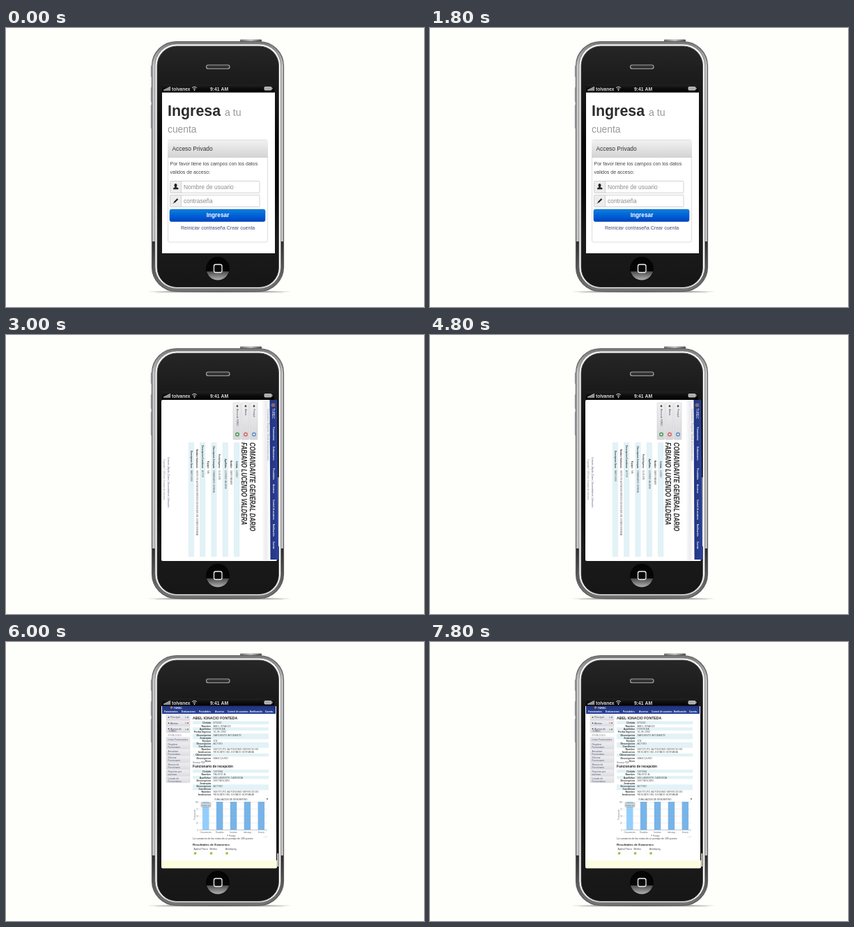
An HTML page with a canvas that plays this animation: 600 by 400 pixels, repeating every 9000 ms.

```html
<!DOCTYPE html>
<html lang="es">
<head>
<meta charset="utf-8">
<title>Acceso móvil</title>
<style>
html, body { margin: 0; width: 100%; height: 100%; overflow: hidden; background: #fefefb; }
canvas { display: block; }
</style>
</head>
<body>
<canvas id="stage" width="600" height="400"></canvas>
<script>
const ctx = document.getElementById('stage').getContext('2d');
const SANS = '"Liberation Sans", Arial, sans-serif';
const SQUASH = 0.75;
const BRAND = 'TUREC';
const MENU = ['Funcionarios', 'Evaluaciones', 'Postulados', 'Ascenso', 'Control de usuarios', 'Notificación', 'Cuenta'];
const ROW_BLUE = '#e2f2f6';

function rect(x, y, w, h, fill) {
  ctx.fillStyle = fill;
  ctx.fillRect(x, y, w, h);
}

function round(x, y, w, h, r, fill, stroke, lineWidth = 1) {
  ctx.beginPath();
  ctx.roundRect(x, y, w, h, r);
  if (fill) { ctx.fillStyle = fill; ctx.fill(); }
  if (stroke) { ctx.strokeStyle = stroke; ctx.lineWidth = lineWidth; ctx.stroke(); }
}

function dot(x, y, r, fill) {
  ctx.beginPath();
  ctx.arc(x, y, r, 0, Math.PI * 2);
  ctx.fillStyle = fill;
  ctx.fill();
}

function line(x1, y1, x2, y2, color, width = 1) {
  ctx.beginPath();
  ctx.moveTo(x1, y1);
  ctx.lineTo(x2, y2);
  ctx.strokeStyle = color;
  ctx.lineWidth = width;
  ctx.stroke();
}

function gradient(x1, y1, x2, y2, ...colors) {
  const g = ctx.createLinearGradient(x1, y1, x2, y2);
  colors.forEach((c, i) => g.addColorStop(i / (colors.length - 1), c));
  return g;
}

function text(str, x, y, size, color = '#333', style = '', align = 'left') {
  ctx.font = `${style} ${size}px ${SANS}`;
  ctx.fillStyle = color;
  ctx.textAlign = align;
  ctx.fillText(str, x, y);
}

// Text on the page turned a quarter clockwise and squeezed along its reading axis.
function sideText(str, x, y, ...rest) {
  ctx.save();
  ctx.translate(x, y);
  ctx.rotate(Math.PI / 2);
  ctx.scale(SQUASH, 1);
  text(str, 0, 0, ...rest);
  ctx.restore();
}

function drawPhone() {
  rect(0, 0, 600, 400, '#fefefb');
  rect(203, 377, 207, 2, gradient(203, 0, 410, 0, '#fefefb', '#8c8c8c', '#777', '#8c8c8c', '#fefefb'));
  rect(215, 379, 183, 1, '#e6e6e4');

  round(336, 16.5, 31, 3, 1, gradient(336, 0, 367, 0, '#666', '#bbb', '#444'));
  for (const [y, h] of [[54, 16], [85, 21], [110, 34]]) {
    round(208, y, 3, h, 1.5, '#d5d5da', '#a3a2ac', 0.8);
  }

  // Chrome rim: the lower part is dark plastic.
  const rim = ctx.createLinearGradient(0, 19, 0, 378);
  rim.addColorStop(0, '#777');
  rim.addColorStop(0.1, '#c4c4c4');
  rim.addColorStop(0.8, '#c4c4c4');
  rim.addColorStop(0.8, '#2c2c2c');
  rim.addColorStop(0.9, '#555');
  rim.addColorStop(1, '#777');
  round(209.5, 19.5, 189, 358, 35, rim, '#5c5c5c', 1.2);
  round(214, 23, 180.5, 350.5, 31, '#f8f8f8', '#777', 0.8);
  round(217, 26, 174.5, 345.5, 28, gradient(0, 26, 0, 372, '#262626', '#171717', '#080808', '#080808', '#1b1b1b', '#161616'), '#444', 0.8);

  round(287.5, 53, 33.5, 5.5, 2.75, '#333', '#a2a2a2', 1.2);

  dot(304, 345, 17, '#050505');
  ctx.save();
  ctx.beginPath();
  ctx.rect(286, 349, 36, 14);
  ctx.clip();
  dot(304, 345, 16.5, gradient(0, 349, 0, 362, '#4a4a4a', '#b5b5b5'));
  ctx.restore();
  round(298.5, 339, 11.5, 11.5, 2.5, '#0a0a0a', '#f2f2f2', 1.3);

  drawStatus();
}

function drawStatus() {
  rect(224, 81, 161, 12, gradient(0, 81, 0, 93, '#222', '#0c0c0c', '#000'));
  for (let i = 0; i < 5; i++) rect(226.5 + i * 2, 88 - i, 1.3, 2 + i, '#ddd');
  text('tolvanex', 238, 89.6, 6.5, '#ddd', 'bold');
  ctx.strokeStyle = '#ddd';
  ctx.lineWidth = 1;
  for (const r of [2.4, 4.6]) {
    ctx.beginPath();
    ctx.arc(270.5, 89, r, -Math.PI * 0.78, -Math.PI * 0.22);
    ctx.stroke();
  }
  dot(270.5, 89, 0.9, '#ddd');
  text('9:41 AM', 293, 89.6, 6.8, '#ddd', 'bold');
  round(371, 84.5, 10, 4.5, 1, '#a9a9a9', '#ddd', 0.8);
  rect(381.5, 85.7, 1, 2, '#ddd');
}

function drawLogin() {
  rect(224, 92.5, 162, 230.5, '#fff');
  text('Ingresa', 232, 126, 21.4, '#2c2c2c', 'bold');
  text('a tu', 314, 126, 14.2, '#999');
  text('cuenta', 232, 150, 13.8, '#999');

  round(232.5, 160.5, 143, 146.5, 2, '#fff', '#dedede');
  rect(232, 161, 144, 25, gradient(0, 161, 0, 186, '#f1f1f1', '#d3d3d3'));
  text('Acceso Privado', 238.5, 176, 8.4, '#333');
  text('Por favor llene los campos con los datos', 235.5, 197, 7, '#444');
  text('validos de acceso:', 235.5, 209, 7, '#444');

  const field = (y, hint) => {
    round(235.5, y + 0.5, 128.5, 17, 1, '#fff', '#d2d2d2');
    rect(236, y + 1, 15.5, 16, '#ededed');
    line(251.5, y + 1, 251.5, y + 17, '#d2d2d2');
    text(hint, 255, y + 11.5, 8.45, '#8c8c8c');
  };
  field(219, 'Nombre de usuario');
  field(239, 'contraseña');

  ctx.beginPath();
  ctx.ellipse(243.5, 225.5, 2, 2.5, 0, 0, Math.PI * 2);
  ctx.fillStyle = '#222';
  ctx.fill();
  round(240, 228.5, 7.5, 2.8, [2, 2, 0, 0], '#222');
  rect(242.5, 226, 2, 3, '#222');
  line(241.5, 250, 246.5, 245, '#222', 2.2);
  line(240, 251.5, 241.5, 250, '#222', 1);

  round(235, 260, 137, 17.5, 2.5, gradient(0, 260, 0, 277, '#0b83dc', '#0062d6', '#0045c4'), '#0755b8', 0.6);
  text('Ingresar', 304, 271.3, 8.3, '#fff', 'bold', 'center');
  text('Reiniciar contraseña Crear cuenta', 251, 289, 7, '#434b74');
}

function drawTurnedPage() {
  round(223, 93, 166, 231, 2, '#fff');
  rect(367, 94, 12, 229, gradient(367, 0, 379, 0, '#fff', '#ececf0', '#fff'));

  // The page leans slightly, so its header bar does too.
  ctx.beginPath();
  ctx.moveTo(378.5, 93);
  ctx.lineTo(389, 93);
  ctx.lineTo(391.5, 322);
  ctx.lineTo(379.5, 322);
  ctx.fillStyle = gradient(379, 0, 391, 0, '#22357f', '#2b419a');
  ctx.fill();
  line(391, 204, 391.5, 303, '#f8f8ee', 1);
  dot(383.5, 100.5, 2.8, '#8a6a58');
  sideText(BRAND, 381.5, 105, 5.9, '#fff');
  const tops = [132, 160, 191, 214, 236, 271, 296];
  MENU.forEach((item, i) => sideText(item, 382.5, tops[i], 4.1, '#fff', 'bold'));
  sideText('Funcionarios / Búsqueda / Detalle del funcionario activo', 374.5, 106, 4, '#8d93aa');

  const buttons = [['Principal', 350, '#5f92c4'], ['Alertas', 338, '#cf6a62'], ['Acerca de ' + BRAND, 326, '#4f9a56']];
  for (const [label, x, color] of buttons) {
    round(x, 97, 11, 53, 1, gradient(0, 97, 0, 150, '#f0f0f1', '#d6d6da'), '#d2d2d4', 0.6);
    dot(x + 6, 102, 1.4, '#444');
    sideText(label, x + 4.5, 106, 4, '#44485c');
    dot(x + 6, 142.5, 3, color);
    line(x + 6, 141, x + 6, 144, '#fff', 1);
    line(x + 4.5, 142.5, x + 7.5, 142.5, '#fff', 1);
  }

  sideText('COMANDANTE GENERAL DARIO', 349.5, 154, 10.7, '#2a2a2a', 'bold italic');
  sideText('FABIANO LUCENDO VALDERA', 338, 154, 10.7, '#2a2a2a', 'bold italic');

  const rows = [
    ['Cédula', '1234567'],
    ['Nombre', 'DARIO FABIANO'],
    ['Apellidos', 'LUCENDO VALDERA'],
    ['Fecha Ingreso', '01-06-1990'],
    ['Descripcion Jerarquia', 'COMANDANTE GENERAL'],
    ['Equipo', 'N/A'],
    ['Descripcion Condicion', 'ACTIVO'],
    ['Nombre Institucion', 'INSTITUTO AUTONOMO SERVICIO DE RESCATE DEL ESTADO SORVANA'],
    ['Descripcion Sexo', 'MASCULINO']
  ];
  rows.forEach(([label, value], i) => {
    const x = 327 - i * 8.15;
    if (i % 2 === 0) rect(x, 154, 8.2, 164, ROW_BLUE);
    sideText(label, x + 2.8, 191, 4, '#333', 'bold', 'right');
    sideText(value, x + 2.8, 194, 3.6, '#555');
  });

  sideText('Contacto | Ayuda | Datos | Desarrolladores | Ubicación', 232, 175, 4, '#555d86');
  sideText('Copyright © 2012 por el equipo de sistemas', 225.5, 178, 4, '#888');
}

function drawRow(top, label, value, blue, height = 4.5) {
  if (blue) rect(268, top, 109, height, ROW_BLUE);
  const put = (str, x, style, align) => str.split('|').forEach((part, i) =>
    text(part, x, top + 3.6 + i * 3.8, 3.6, style ? '#333' : '#555', style, align));
  put(label, 294, 'bold', 'right');
  put(value, 297.5, '', 'left');
}

function drawRows(top, rows) {
  rows.forEach(([label, value], i) => {
    const height = label.includes('|') ? 8 : 4.45;
    drawRow(top, label, value, i % 2 === 0, height);
    top += height;
  });
}

function drawChart() {
  text('EVALUACION DE DESEMPEÑO', 323, 227, 3.2, '#444', '', 'center');
  rect(374, 224, 2, 2, '#888');
  for (let i = 0; i < 5; i++) {
    line(277, 229.5 + i * 10, 375, 229.5 + i * 10, '#dedede', 0.5);
    text(String(100 - i * 25), 276, 231 + i * 10, 2.6, '#777', '', 'right');
  }
  for (let i = 0; i < 5; i++) {
    const x = 282 + i * 19.9;
    rect(x, 229, 9.5, 40.5, i ? '#78b4e8' : '#94cefa');
    text(['Conocimiento', 'Disciplina', 'Iniciativa', 'Liderazgo', 'Servicio'][i], x + 4.7, 274, 2.6, '#666', '', 'center');
  }
  line(277, 269.5, 375, 269.5, '#a8b8cc', 0.7);
  round(280, 230.5, 14, 6, 1, 'rgba(205,210,210,.9)', '#8c9ba6', 0.5);
  text('Puntaje: 100', 281, 234.5, 2.2, '#444');
  ctx.save();
  ctx.translate(272, 255);
  ctx.rotate(-Math.PI / 2);
  text('Puntuación', 0, 0, 3, '#777');
  ctx.restore();
  dot(318, 277.4, 0.9, '#70b0e7');
  text('Puntaje', 320, 278.5, 2.8, '#555');
  text('gráfico', 376, 280, 2.2, '#bbb', '', 'right');
}

function drawProfile() {
  rect(223, 92, 165, 221, '#fff');
  round(223, 313, 166, 11.5, [0, 0, 2, 2], '#fcfce0');
  rect(389.5, 303, 1.5, 19, '#fcfce0');
  rect(224, 91.5, 163, 11.5, gradient(0, 92, 0, 103, '#20337d', '#2a429a'));
  dot(237.5, 94, 1.7, '#c9853c');
  text(BRAND, 240.5, 95.5, 3.6, '#fff', 'bold');
  const lefts = [227, 252, 277, 300, 318, 350, 372];
  MENU.forEach((item, i) => text(item, lefts[i], 101, 3.15, '#fff', 'bold'));

  const button = (y, h) => round(230, y, 34, h, 0.8, gradient(0, y, 0, y + h, '#efeff2', '#dcdce2'), '#d2d2d8', 0.5);
  const links = [['Principal', 104, 8, '#4f91d2'], ['Alertas', 112.5, 7.5, '#d65449'], ['Acerca de', 120.5, 9.5, '#3b9c46']];
  links.forEach(([label, y, h, color], i) => {
    button(y, h);
    dot(233.5, y + 3.8, 0.9, '#334');
    text(label, 236, y + 5, 3.5, '#474b60');
    if (i === 2) text(BRAND, 233, y + 8.5, 3.5, '#474b60');
    dot(258, y + h / 2, 0.9, '#9aa');
    dot(261, y + h / 2, 1.1, color);
  });
  text('OPERACIONES', 232, 134.5, 2.7, '#888');
  const actions = ['Listar Funcionarios', 'Registrar|Funcionario', 'Actualizar|Funcionario', 'Eliminar|Funcionario',
    'Manejo de|Funcionario', 'Reportes por|ascenso', 'Listado de|Funcionarios'];
  actions.forEach((label, i) => {
    const y = i ? 134 + i * 9.75 : 136.5;
    button(y, i ? 9.2 : 6.5);
    label.split('|').forEach((part, k) => text(part, 232.5, y + 4.2 + k * 3.8, 3.4, '#555a70'));
  });

  text('ABEL IGNACIO FONTEDA', 268, 111, 5.2, '#222', 'bold');
  drawRows(113.5, [
    ['Cédula', '871002'],
    ['Nombre', 'ABEL IGNACIO'],
    ['Apellidos', 'FONTEDA'],
    ['Fecha Ingreso', '16-06-1992'],
    ['Descripcion|Jerarquia', 'SARGENTO AYUDANTE'],
    ['Equipo', '204'],
    ['Descripcion|Condicion', 'ACTIVO'],
    ['Nombre|Institucion', 'INSTITUTO AUTONOMO SERVICIO DE|RESCATE DEL ESTADO SORVANA'],
    ['Observacion', ''],
    ['Descripcion|Sexo', 'MASCULINO']
  ]);
  text('Generar PDF', 268, 174.3, 3, '#4a567f');
  text('Funcionario de recepción', 268, 180.3, 4.75, '#222', 'bold');
  drawRows(183, [
    ['Cédula', '1107088'],
    ['Nombre', 'FAUSTO A.'],
    ['Apellidos', 'BELLAMONTE CARDEÑA'],
    ['Descripcion|Jerarquia', 'DISTINGUIDO'],
    ['Descripcion|Condicion', 'ACTIVO'],
    ['Nombre|Institucion', 'INSTITUTO AUTONOMO SERVICIO DE|RESCATE DEL ESTADO SORVANA']
  ]);

  drawChart();
  text('La sumatoria de las notas da un puntaje de 100 puntos', 268, 283.2, 3.55, '#444');
  text('Resultados de Examenes', 268, 291.6, 4.4, '#222', 'bold');
  for (const [label, x] of [['Aptitud Física', 269.5], ['Médico', 292.5], ['Antidoping', 315]]) {
    text(label, x, 298, 3.3, '#444');
    dot(x + 2, 302.8, 1.9, '#8fbd3f');
    dot(x + 1.6, 302.2, 0.7, '#d3e89b');
  }
}

const SCREENS = [drawLogin, drawTurnedPage, drawProfile];
const HOLD = 3000;

function render() {
  drawPhone();
  SCREENS[Math.floor(performance.now() / HOLD) % SCREENS.length]();
  requestAnimationFrame(render);
}
render();
</script>
</body>
</html>
```
